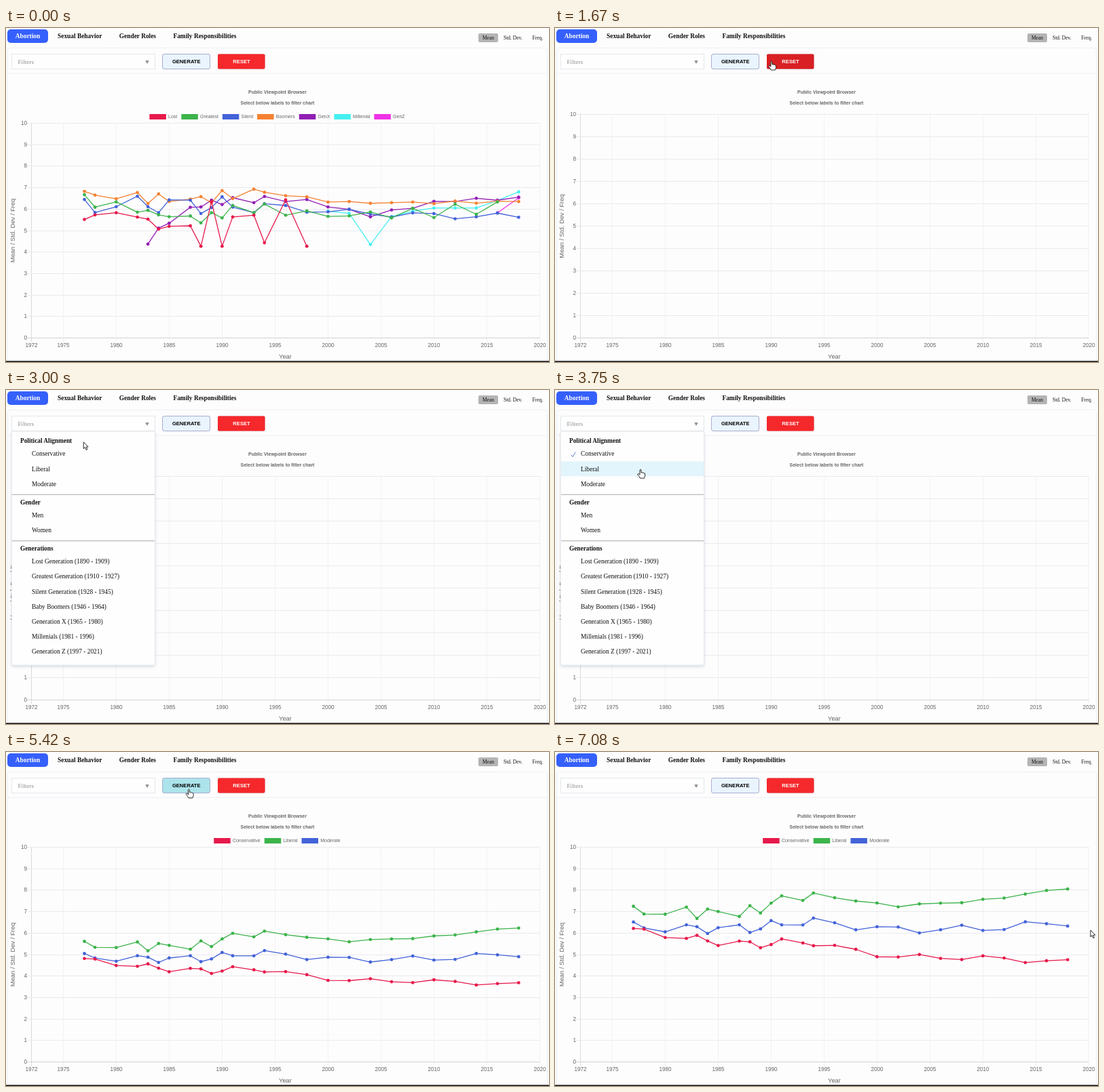
Recreate the animation shown at these times as an HTML page. Size 800 by 493 pixels, loop 7.16 s.

```html
<!DOCTYPE html>
<html lang="en">
<head>
<meta charset="utf-8">
<title>Survey chart</title>
<style>
  html, body { margin: 0; width: 100%; height: 100%; overflow: hidden; background: #fefdfe; }
  svg { display: block; width: 800px; height: 493px; }
  text { font-family: "Liberation Sans", Arial, sans-serif; fill: #666; white-space: pre; }
  .serif { font-family: "Liberation Serif", "Times New Roman", serif; fill: #111; }
  .bold { font-weight: bold; }
  .mid { text-anchor: middle; }
  .end { text-anchor: end; }
  .shadow { filter: drop-shadow(.5px .8px .7px rgba(40, 50, 110, .4)); }
  .panel { filter: drop-shadow(0 2px 2px rgba(60, 90, 110, .2)); }
</style>
</head>
<body>
<svg id="stage" viewBox="0 0 800 493"></svg>
<script>
const LOOP = 7160;
const CLEAR = 1420, OPEN = 2600, PLOT = 5110;
const BASE = 457.5, LEFT = 37.5, RIGHT = 786.5;
const FULL_TOP = 140.5, EMPTY_TOP = 127.5;
const yearX = y => LEFT + (y - 1972) * (RIGHT - LEFT) / 48;

// Survey years: nearly annual up to 1994, then every second year
const skipped = [1979, 1981, 1986, 1992];
const years = [];
for (let y = 1977; y <= 2018; y++)
  if (y <= 1994 ? !skipped.includes(y) : y % 2 === 0) years.push(y);

// A series follows evenly spaced levels, plus a wave that is
// `early` high in the first half and `late` high in the second.
const still = { early: 0, late: 0, period: 2, peak: 0 };
const generations = [
  { name: 'Lost', color: '#e6194b', to: 1998, levels: [5.6, 5.85, 5.15, 5.2, 5.2, 5.4, 5.2],
    wave: { early: .1, late: 1.15, period: 2.5, peak: 9 } },
  { name: 'Greatest', color: '#3cb44b', to: 2016, levels: [6.45, 5.85, 5.5, 6.1, 5.7, 5.8, 6.1],
    wave: { early: .22, late: .28, period: 2.2, peak: 11 } },
  { name: 'Silent', color: '#4363d8', levels: [6.2, 6.2, 6.15, 6.2, 5.85, 5.7, 5.65],
    wave: { early: .4, late: .15, period: 3.5, peak: 10 } },
  { name: 'Boomers', color: '#f58231', levels: [6.7, 6.5, 6.45, 6.85, 6.3, 6.3, 6.35],
    wave: { early: .25, late: .06, period: 2.4, peak: 2.8 } },
  { name: 'GenX', color: '#911eb4', from: 1983, levels: [4.5, 6.2, 6.4, 6.5, 5.7, 6.4, 6.5],
    wave: { early: .13, late: .06, period: 2, peak: 1 } },
  { name: 'Millenial', color: '#46f0f0', from: 2000,
    levels: [5.9, 5.8, 4.35, 5.65, 5.9, 6.05, 6.05, 6.05, 6.4, 6.8] },
  { name: 'GenZ', color: '#f032e6', from: 2016, levels: [5.83, 6.52] }
];
const politics = [
  { name: 'Conservative', color: '#e6194b', levels: [6.15, 5.7, 5.45, 5.6, 4.9, 4.85, 4.65],
    wave: { early: .18, late: .12, period: 3.45, peak: 11 } },
  { name: 'Liberal', color: '#3cb44b', levels: [7, 6.95, 7, 7.9, 7.25, 7.5, 8.1],
    wave: { early: .28, late: .05, period: 2.6, peak: 2.8 } },
  { name: 'Moderate', color: '#4363d8', levels: [6.3, 6.2, 6.2, 6.6, 6.15, 6.2, 6.5],
    wave: { early: .22, late: .18, period: 3.3, peak: 10 } }
];

function seriesPoints({ from = 1977, to = 2018, levels, wave = still }) {
  const xs = years.filter(y => y >= from && y <= to), last = xs.length - 1;
  return xs.map((year, i) => {
    const p = i / last * (levels.length - 1), a = Math.min(Math.floor(p), levels.length - 2);
    const level = levels[a] + (levels[a + 1] - levels[a]) * (p - a);
    const amp = i < last / 2 ? wave.early : wave.late;
    const value = level + amp * Math.cos(2 * Math.PI * (i - wave.peak) / wave.period);
    return [yearX(year), value * (BASE - FULL_TOP) / 10];
  });
}

function add(parent, tag, attrs = {}) {
  const el = document.createElementNS('http://www.w3.org/2000/svg', tag);
  for (const k in attrs) el.setAttribute(k, attrs[k]);
  return parent.appendChild(el);
}
// y is the middle of the capitals
function label(parent, x, y, size, str, cls = '', attrs = {}) {
  const el = add(parent, 'text', { x, y: y + size * .34, 'font-size': size, class: cls, ...attrs });
  el.textContent = str;
  return el;
}
const box = (parent, x, y, width, height, fill, attrs = {}) =>
  add(parent, 'rect', { x, y, width, height, fill, ...attrs });
const line = (parent, x1, y1, x2, y2, stroke) =>
  add(parent, 'path', { d: `M${x1} ${y1}L${x2} ${y2}`, stroke, fill: 'none' });
const show = (el, on) => el.setAttribute('display', on ? 'inline' : 'none');

const stage = document.getElementById('stage');
box(stage, 0, 0, 800, 493, '#fefdfe');

// Header
box(stage, 2, 2, 60, 20, '#3660fb', { rx: 5 });
label(stage, 32, 12.3, 9.4, 'Abortion', 'serif bold mid', { style: 'fill:#fff' });
let tabX = 76;
for (const s of ['Sexual Behavior', 'Gender Roles', 'Family Responsibilities'])
  tabX += label(stage, tabX, 12.3, 9.4, s, 'serif bold').getComputedTextLength() + 25.4;
box(stage, 696, 8, 29, 13, '#b4b4b5', { rx: 2 });
['Mean', 'Std. Dev.', 'Freq.'].forEach((s, i) => label(stage, 710.5 + i * 36.4, 14.8, 7.5, s, 'serif mid'));

// Frame and toolbar
box(stage, 2.5, 29.5, 795, 470, 'none', { rx: 3, stroke: '#eeedf2' });
line(stage, 2, 67, 798, 67, '#eeedf2');
box(stage, 8.5, 38.5, 211, 22, '#fefefe', { stroke: '#e3e8ec' });
label(stage, 17.5, 49.5, 9.2, 'Filters', 'serif', { style: 'fill:#8b8b8b' });
add(stage, 'path', { d: 'M205.3 48h5.4l-2.7 5z', fill: '#8f8f8f' });
const generate = box(stage, 230.5, 38.5, 70, 22, '#e9f4fe', { rx: 3, stroke: '#a9aed0', class: 'shadow' });
label(stage, 265.7, 49.6, 7.6, 'GENERATE', 'bold mid', { style: 'fill:#000' });
const reset = box(stage, 312, 38.5, 69.5, 22, '#f5282b', { rx: 2, class: 'shadow' });
label(stage, 347, 49.6, 7.6, 'RESET', 'bold mid', { style: 'fill:#fff' });

// Chart
label(stage, 400, 94.5, 7, 'Public Viewpoint Browser', 'bold mid');
label(stage, 400, 111, 7, 'Select below labels to filter chart', 'bold mid');
label(stage, 411.5, 485, 9.4, 'Year', 'mid');

function makeGrid(top) {
  const g = add(stage, 'g');
  const ticks = [1972];
  for (let y = 1975; y <= 2020; y += 5) ticks.push(y);
  for (const y of ticks) {
    const x = Math.floor(yearX(y)) + .5;
    line(g, x, top, x, 463, y === 1972 ? '#dad9db' : '#f2f1f3');
    label(g, x, 468, 8.2, y, 'mid');
  }
  for (let v = 0; v <= 10; v++) {
    const y = Math.floor(BASE - v * (BASE - top) / 10) + .5;
    line(g, 31.5, y, RIGHT, y, v ? '#eae9eb' : '#d2d1d3');
    label(g, 31, y, 8.2, v, 'end');
  }
  const mid = (top + BASE) / 2;
  label(g, 10, mid, 9.4, 'Mean / Std. Dev / Freq', 'mid', { transform: `rotate(-90 10 ${mid})` });
  return g;
}

function makeLegend(parent, series) {
  const g = add(parent, 'g');
  let x = 0;
  for (const { name, color } of series) {
    box(g, x, 127, 24.5, 8, color);
    x += 27.7 + label(g, x + 27.7, 131, 7, name).getComputedTextLength() + 6;
  }
  g.setAttribute('transform', `translate(${399.5 - (x - 6) / 2} 0)`);
}

function makePlot(series) {
  const g = add(stage, 'g');
  makeLegend(g, series);
  const curves = [...series].reverse().map(s => {
    const pts = seriesPoints(s);
    const path = add(g, 'polyline', { fill: 'none', stroke: s.color, 'stroke-width': 1.3, 'stroke-linejoin': 'round' });
    const dots = pts.map(([x]) => add(g, 'circle', { cx: x, r: 2.4, fill: s.color }));
    return { pts, path, dots };
  });
  const grow = k => curves.forEach(({ pts, path, dots }) => {
    path.setAttribute('points', pts.map(([x, h]) => `${x},${BASE - h * k}`).join(' '));
    dots.forEach((d, i) => d.setAttribute('cy', BASE - pts[i][1] * k));
  });
  grow(1);
  return { g, grow };
}

const emptyGrid = makeGrid(EMPTY_TOP), fullGrid = makeGrid(FULL_TOP);
const before = makePlot(generations), after = makePlot(politics);
box(stage, 0, 491.4, 800, 1.6, '#161618');

// Filter menu
const menu = add(stage, 'g');
box(menu, 8.5, 61, 211, 345, '#fefefe', { rx: 2, stroke: '#e6ebef', class: 'panel' });
const rowTint = box(menu, 9, 0, 210, 22, '#e2f5fc');
const rows = [];
const groups = {
  'Political Alignment': ['Conservative', 'Liberal', 'Moderate'],
  'Gender': ['Men', 'Women'],
  'Generations': ['Lost Generation (1890 - 1909)', 'Greatest Generation (1910 - 1927)',
    'Silent Generation (1928 - 1945)', 'Baby Boomers (1946 - 1964)', 'Generation X (1965 - 1980)',
    'Millenials (1981 - 1996)', 'Generation Z (1997 - 2021)']
};
let menuY = 75;
for (const [head, items] of Object.entries(groups)) {
  if (rows.length) line(menu, 9, menuY - 11.2, 219, menuY - 11.2, '#a9a9ab');
  label(menu, 21, menuY, 9.3, head, 'serif bold');
  items.forEach((s, i) => {
    const y = menuY + 19.2 + i * 22.17;
    label(menu, 38, y, 9.4, s, 'serif');
    rows.push(y);
  });
  menuY = rows[rows.length - 1] + 27;
}
const checks = [3300, 3900, 4280].map((at, i) => ({
  at,
  el: add(menu, 'path', { d: `M24 ${rows[i] + 1.6}l2.2 2.8l4-7`, fill: 'none', stroke: '#6579c9' })
}));

// Pointer shapes, tip at the origin
const arrow = add(stage, 'path', {
  d: 'M0 0v9.8l2.2-2l1.7 3.9l1.7-.8l-1.7-3.7h3z', fill: '#fff', stroke: '#111', 'stroke-width': .9
});
const hand = add(stage, 'path', {
  d: 'M-1 1Q0-.5 1 1V5Q2.2 4.2 3 5.3Q4.2 4.6 5 5.8Q6.4 5.4 6.6 7V9.8Q6.4 11 5.4 13.2H-.6Q-1.4 11-4.2 8Q-4.4 6.4-2.8 6.6L-1 8.2z',
  fill: '#fff', stroke: '#111', 'stroke-width': .9, 'stroke-linejoin': 'round'
});
// Time and place of each stop on the pointer's way
const stops = [
  [830, 420, 160], [1000, 327, 68], [1450, 343, 52], [2250, 214, 35], [2600, 155, 50], [3300, 88, 94],
  [3750, 126, 117], [4280, 84, 138], [4920, 262, 50], [5830, 275, 58], [7080, 789, 263]
];

function pointerAt(t) {
  if (t < stops[0][0]) return null;
  const i = stops.findIndex(s => s[0] > t);
  if (i < 0) return stops[stops.length - 1].slice(1);
  const [t0, x0, y0] = stops[i - 1], [t1, x1, y1] = stops[i];
  const p = (t - t0) / (t1 - t0), k = p * p * (3 - 2 * p);
  return [x0 + (x1 - x0) * k, y0 + (y1 - y0) * k];
}

function render(t) {
  const plotted = t >= PLOT, cleared = t >= CLEAR && !plotted;
  const open = t >= OPEN && !plotted;
  show(emptyGrid, cleared);
  show(fullGrid, !cleared);
  show(before.g, t < CLEAR);
  show(after.g, plotted);
  if (plotted) after.grow(1 - (1 - Math.min(1, (t - PLOT) / 1000)) ** 4);
  show(menu, open);
  checks.forEach(c => show(c.el, t >= c.at));

  const pos = pointerAt(t), [x, y] = pos || [-99, -99];
  const inBar = y >= 38 && y <= 61;
  const onGenerate = inBar && x >= 231 && x <= 301;
  const onReset = inBar && x >= 312 && x <= 382;
  const row = open && x > 9 && x < 219 ? rows.find(r => Math.abs(y - r) <= 11.1) : undefined;
  generate.setAttribute('fill', onGenerate ? '#ace3ea' : '#e9f4fe');
  reset.setAttribute('fill', onReset ? '#d92024' : '#f5282b');
  show(rowTint, row !== undefined);
  if (row !== undefined) rowTint.setAttribute('y', row - 11);

  const pointing = onGenerate || onReset || row !== undefined;
  show(hand, pos && pointing);
  show(arrow, pos && !pointing);
  (pointing ? hand : arrow).setAttribute('transform', `translate(${x} ${y})`);
}

const start = performance.now();
function tick() {
  render((performance.now() - start) % LOOP);
  requestAnimationFrame(tick);
}
tick();
</script>
</body>
</html>
```
